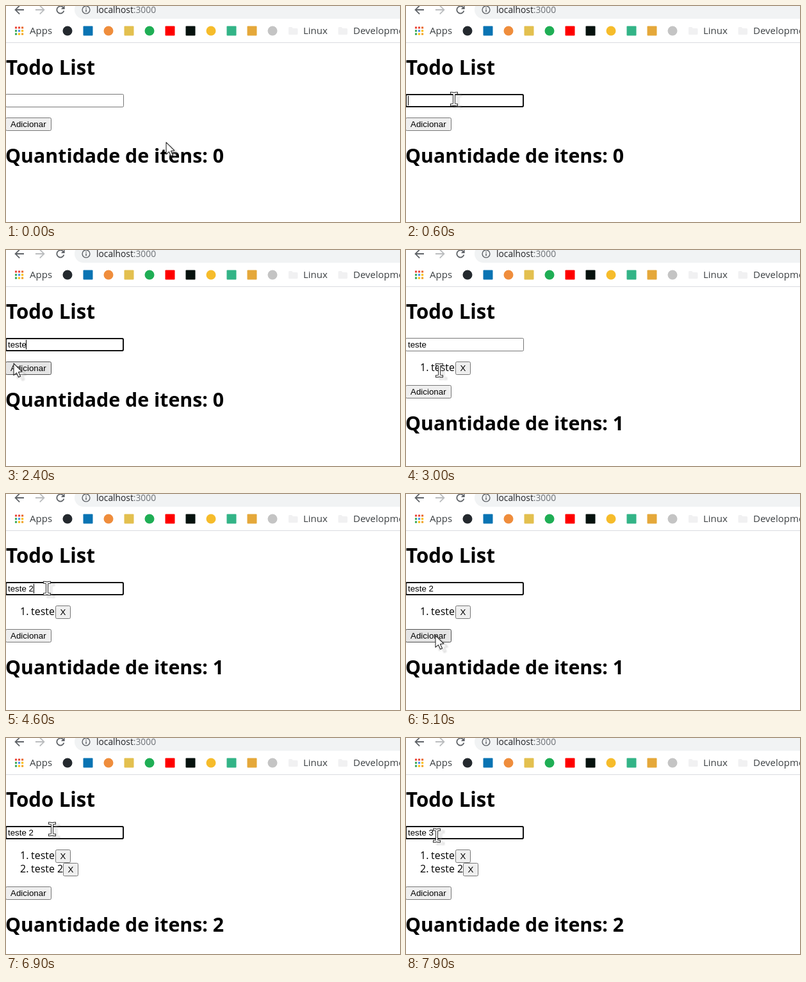
Write an HTML page that moves like this. It is 615 px wide and 339 px high and loops after 8000 ms.

```html
<!DOCTYPE html>
<html lang="pt">
<head>
<meta charset="utf-8">
<title>Todo List</title>
<style>
  html, body { margin: 0; width: 100%; height: 100%; overflow: hidden; background: #fff; }
  svg { display: block; }
  text { font: 16px "Open Sans", "Noto Sans", sans-serif; fill: #000; white-space: pre; }
  .bold { font-weight: 700; font-size: 30.3px; }
  .title { font-size: 31.3px; }
  .mark { font-size: 15px; fill: #3c4043; }
  .url { font-size: 13.8px; fill: #202124; }
  .form { font: 13.333px "Liberation Sans", Arial, sans-serif; }
  .mid { text-anchor: middle; }
  .line { fill: none; stroke: #5f6368; stroke-width: 1.8; }
  .off { stroke: #babcbe; }
  .btn { fill: #efefef; stroke: #767676; }
  .btn.hover { fill: #e5e5e5; stroke: #4f4f4f; }
  .field { fill: #fff; stroke: #767676; }
  .field.hover { stroke: #4f4f4f; }
  .ring { fill: #fff; stroke: #101010; stroke-width: 2; }
  .arrow { fill: #fff; stroke: #2b2b2b; stroke-width: 1.1; stroke-linejoin: round; }
  .shade { opacity: .26; filter: blur(.9px); }
  .shade .arrow { fill: #000; stroke: #000; }
  .edge { fill: none; stroke: #2b2b2b; stroke-width: 4; stroke-linecap: square; }
  .core { fill: none; stroke: #fff; stroke-width: 2; stroke-linecap: square; }
  .shade .core { stroke: #000; }
</style>
</head>
<body>
<svg width="615" height="339" viewBox="0 0 615 339">
  <defs>
    <path id="arrow" class="arrow" d="M0 0V18.6L4.4 14.8L7.6 21.6L10.6 20.2L7.4 13.6L13 13Z"/>
    <path id="bar" d="M-4-9.300Q0-9.300 0-7V7Q0 9.300-4 9.300M4-9.300Q0-9.300 0-7V7Q0 9.300 4 9.300"/>
    <g id="beam"><use href="#bar" class="edge"/><use href="#bar" class="core"/></g>
    <path id="folder" fill="#f1f1f2" d="M0 1.5Q0 0 1.5 0H5L7 2H13Q14.5 2 14.5 3.5V10.5Q14.5 12 13 12H1.5Q0 12 0 10.5Z"/>
  </defs>

  <!-- toolbar -->
  <path class="line" d="M28 6H15M21.2-.6L14.6 6L21.2 12.6"/>
  <path class="line off" d="M46 6H59M52.8-.6L59.4 6L52.8 12.6"/>
  <path class="line" d="M90.4 7.5A5.6 5.6 0 1 1 89 2.1"/>
  <path fill="#5f6368" d="M91.6-.8V5H85.8Z"/>
  <rect x="107" y="-8" width="540" height="28" rx="14" fill="#f1f3f4"/>
  <circle class="line" cx="125" cy="6" r="5.9" style="stroke-width:1.4"/>
  <path fill="#5f6368" d="M124.3 5.2h1.5v4h-1.5zM124.3 2.5h1.5v1.5h-1.5z"/>
  <text class="url" x="141" y="11">localhost<tspan fill="#6b6f74">:3000</tspan></text>

  <!-- bookmarks -->
  <g id="marks"></g>
  <text class="mark" x="37" y="44">Apps</text>
  <use href="#folder" x="441" y="33"/>
  <text class="mark" x="464" y="44">Linux</text>
  <use href="#folder" x="518.5" y="33"/>
  <text class="mark" x="542" y="44">Development</text>
  <rect y="57" width="615" height="1" fill="#dadce0"/>

  <!-- page -->
  <text class="bold title" x="0" y="108">Todo List</text>
  <rect id="field" class="field" x="-.5" y="138.5" width="184" height="20" rx="1.8"/>
  <rect id="ring" class="ring" x="0" y="139" width="183" height="19" rx="2"/>
  <text id="typed" class="form" x="3" y="153"></text>
  <rect id="caret" y="141" width="1" height="15"/>
  <g id="list"></g>
  <g id="foot">
    <rect id="add" class="btn" x="-.5" y="175.5" width="71" height="20" rx="2"/>
    <text class="form" x="7" y="190">Adicionar</text>
    <text id="count" class="bold" x="-1" y="246"></text>
  </g>

  <g id="pointer">
    <g id="asArrow"><g class="shade"><use href="#arrow" x="6" y="5"/></g><use href="#arrow"/></g>
    <g id="asBeam"><g class="shade"><use href="#beam" x="6" y="3.5"/></g><use href="#beam"/></g>
  </g>
</svg>
<script>
const LOOP = 8000, STEP = 100, BLINK = 500, ROW = 21;
const $ = id => document.getElementById(id);
const show = (el, on) => el.style.display = on ? '' : 'none';

// app grid, then one plain icon every 32 px
const box = (cx, cy, size, fill, rx) =>
  `<rect x="${cx - size / 2}" y="${cy - size / 2}" width="${size}" height="${size}" rx="${rx}" fill="${fill}"/>`;
const dots = ['#ea4335', '#ea4335', '#e8662b', '#34a853', '#4285f4', '#fbbc04', '#34a853', '#fbbc04', '#f0a020'];
const discs = ['#24292e', '#ef8d3c', '#1fae55', '#f6bc2b', '#c4c4c4'];
const icons = ['#24292e', '#0a74b3', '#ef8d3c', '#e3c04f', '#1fae55', '#f00',
  '#06120e', '#f6bc2b', '#33b487', '#e5a83a', '#c4c4c4'];
$('marks').innerHTML =
  dots.map((fill, i) => box(15.6 + i % 3 * 5, 34 + Math.floor(i / 3) * 5, 3.2, fill, .4)).join('') +
  icons.map((fill, i) => box(96 + 32 * i, 39, 15, fill, discs.includes(fill) ? 7.5 : 1)).join('');

// list rows: label and left edge of the delete button
const rows = [['teste', 77.5], ['teste 2', 89.5]];
$('list').innerHTML = rows.map(([label, x], i) =>
  `<g transform="translate(0 ${ROW * i})"><text x="22" y="190">${i + 1}.</text><text x="39" y="190">${label}</text>
  <rect class="btn" x="${x}" y="175.5" width="23" height="20" rx="2"/>
  <text class="form mid" x="${x + 11.5}" y="190">X</text></g>`).join('');

// what the user does to the form
const events = [
  { at: 0, text: '', focus: false, items: 0 },
  { at: 600, focus: true },
  { at: 1500, text: 't' },
  { at: 1800, text: 'tes' },
  { at: 2000, text: 'test' },
  { at: 2200, text: 'teste' },
  { at: 3000, focus: false, items: 1 },
  { at: 3700, focus: true },
  { at: 4200, text: 'teste ' },
  { at: 4400, text: 'teste 2' },
  { at: 5200, focus: false, items: 2 },
  { at: 6400, focus: true },
  { at: 7400, text: 'teste 3' },
];

// pointer moves: start, number of steps, goal
const home = [250, 214];
const moves = [
  [100, 1, 212, 211], [300, 2, 75, 146], [800, 2, 186, 202], [2200, 3, 12, 178],
  [2500, 4, 52, 189], [3100, 3, 64, 148], [4700, 5, 46, 222], [5500, 1, 50, 206],
  [5700, 3, 69, 147], [6100, 1, 70, 143], [6900, 2, 73, 143], [7900, 1, 48, 153],
];
const easeOut = p => 1 - (1 - p) ** 1.6;

function pointerAt(t) {
  let [x, y] = home;
  for (const [start, steps, goalX, goalY] of moves) {
    if (t < start) break;
    const k = easeOut(Math.min(1, (Math.floor((t - start) / STEP) + 1) / steps));
    x += (goalX - x) * k;
    y += (goalY - y) * k;
  }
  return [x, y];
}

function draw(t) {
  const { at, text, focus, items } = Object.assign({}, ...events.filter(e => e.at <= t));
  const [x, y] = pointerAt(t);
  const drop = items && 16 + ROW * items;
  const inside = (left, top, right, height) => x >= left && x < right && y >= top && y < top + height;
  const inField = inside(0, 138, 184, ROW);
  const onLabel = rows.slice(0, items).some(([, right], i) => inside(39, 175 + ROW * i, right, ROW));

  $('typed').textContent = text;
  $('caret').setAttribute('x', Math.floor(3.05 + $('typed').getComputedTextLength()));
  show($('caret'), focus && Math.floor((t - at) / BLINK) % 2 === 0);
  show($('ring'), focus);
  $('field').classList.toggle('hover', inField);

  [...$('list').children].forEach((row, i) => show(row, i < items));
  $('foot').setAttribute('transform', `translate(0 ${drop})`);
  $('count').textContent = 'Quantidade de itens: ' + items;
  $('add').classList.toggle('hover', inside(0, 175 + drop, 71, ROW));

  $('pointer').setAttribute('transform', `translate(${x} ${y})`);
  show($('asBeam'), inField || onLabel);
  show($('asArrow'), !inField && !onLabel);
}

const start = performance.now();
function tick() {
  draw((performance.now() - start) % LOOP);
  requestAnimationFrame(tick);
}
tick();
</script>
</body>
</html>
```
